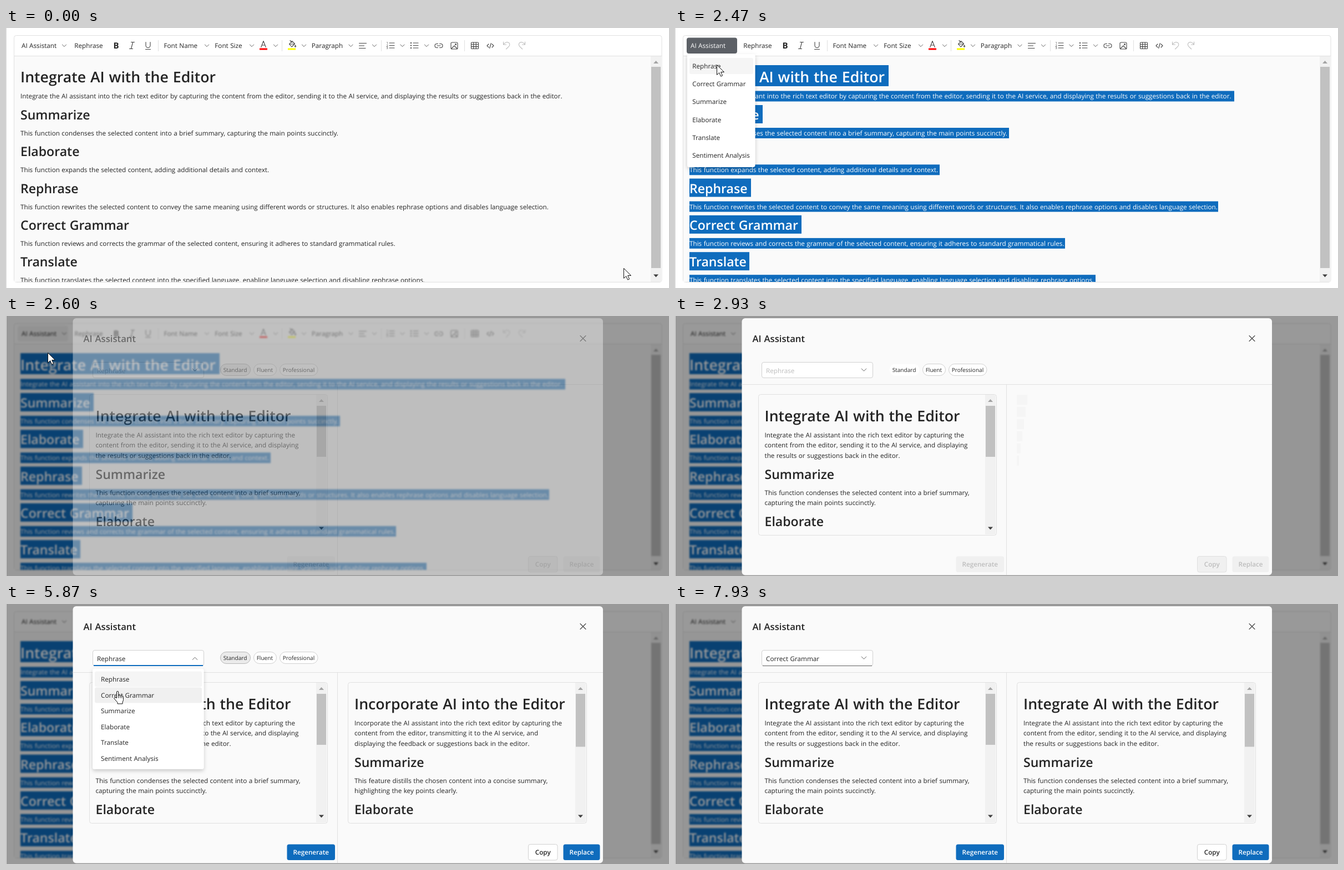
An HTML page for the animation above (8000 ms loop, 1195 by 469 pixels).

```html
<!DOCTYPE html>
<html lang="en">
<head>
<meta charset="utf-8">
<title>AI assistant in a rich text editor</title>
<style>
html, body { margin: 0; width: 100%; height: 100%; overflow: hidden; background: #fff; }
svg { display: block; width: 100vw; height: 100vh; }
text { font: 11.71px "Open Sans", "Noto Sans", sans-serif; fill: #242424; word-spacing: .034em;
  text-rendering: geometricPrecision; white-space: pre; }
.h1 { font-size: 26.7px; font-weight: 600; }
.h2 { font-size: 23.1px; font-weight: 600; }
.title { font-size: 16.7px; font-weight: 600; }
.chip { font-size: 10.05px; }
.btn { font-weight: 600; text-anchor: middle; }
.mark { fill: #0f6cbd; display: none; }
.selected .mark { display: inline; }
.selected text { fill: #fff; }
.icon { fill: none; stroke: #424242; stroke-width: 1.1; stroke-linecap: round; stroke-linejoin: round; }
.thin { stroke: #616161; stroke-width: 1; }
.faint { stroke: #bdbdbd; }
.busy .btn, .busy .value { fill: #bdbdbd; }
.busy .btnbox { fill: #f0f0f0; stroke: none; }
.busy .outline { stroke: #e0e0e0; }
.primary { fill: #0f6cbd; }
.onblue { fill: #fff; }
.outline { fill: #fff; stroke: #d1d1d1; }
</style>
</head>
<body>
<svg id="stage" viewBox="0 0 1195 469" xmlns="http://www.w3.org/2000/svg"></svg>
<script>
const TICK = 1000 / 15, LOOP = 8000;

const text = (x, y, s, cls = '', extra = '') => `<text x="${x}" y="${y}" class="${cls}" ${extra}>${s}</text>`;
const rect = (x, y, w, h, fill, extra = '') =>
  `<rect x="${x}" y="${y}" width="${w}" height="${h}" ${fill ? `fill="${fill}"` : ''} ${extra}/>`;
const icon = (d, cls = '', extra = '') => `<path class="icon ${cls}" d="${d}" ${extra}/>`;
const chevron = (x, y, up, r = 3.6) =>
  icon(`M${x - r} ${y + (up ? 2 : -2)}l${r} ${up ? -r : r} ${r} ${up ? r : -r}`, 'thin');
const group = (id, body, extra = '') => `<g id="${id}" ${extra}>${body}</g>`;

function scrollbar(x, top, bottom, thumbTop, thumbBottom) {
  const m = x + 9.5;
  return rect(x, top, 19, bottom - top, '#f1f1f1') +
    rect(x + 1, thumbTop, 17, thumbBottom - thumbTop, '#c1c1c1') +
    `<path d="M${m - 4.5} ${top + 13}l4.5 -5 4.5 5z" fill="#a3a3a3"/>` +
    `<path d="M${m - 4.5} ${bottom - 13.5}l4.5 5 4.5 -5z" fill="#404040"/>`;
}

function toolbar() {
  const labels = [[123.3, 'Rephrase'], [284.5, 'Font Name'], [376.3, 'Font Size'], [550.8, 'Paragraph']];
  return labels.map(([x, s]) => text(x, 36.3, s)).join('') +
    [362, 443, 486, 537, 621.5, 664, 714.5, 758].map(x => chevron(x, 32)).join('') +
    [274.5, 497.5, 676.5, 826.5].map(x => rect(x - .5, 22, 1, 20, '#e0e0e0')).join('') +
    text(193.5, 37.3, 'B', '', 'style="font-size:15px;font-weight:700"') +
    icon('M225.5 25.5h6M222.5 37.5h6M228.8 25.5l-3.4 12') +
    icon('M252 25.5v6a4 4 0 0 0 8 0v-6M251.5 38.5h9') +
    icon('M459.8 34.5l4.2 -11 4.2 11M461.2 31h5.6') + rect(457, 36.5, 14, 3, '#ff0000') +
    icon('M510.5 29l5 -5.5 5 5 -5.5 5.5zM512 22.5l3.5 3.5M510.5 29h9M521.5 31q-2 3 0 3.3 2 -.3 0 -3.3') +
    rect(508, 36.5, 14, 3, '#ffff00') +
    icon('M636.5 27.5h13M636.5 32h9M636.5 36.5h11.5') +
    [27, 31.5, 36].map((y, i) => icon(`M691 ${y}h9`) +
      text(685.5, y + 2, i + 1, '', 'style="font-size:5.5px"') +
      icon(`M734 ${y}h9`) + rect(729, y - 1, 2, 2, '#424242')).join('') +
    icon('M778.5 28.5h-2a3.4 3.4 0 0 0 0 7h2M781.5 28.5h2a3.4 3.4 0 0 1 0 7h-2M777 32h6') +
    rect(802, 26, 12, 12, 'none', 'rx="2" class="icon"') + icon('M803 37l5 -5 5 5') +
    '<circle cx="810.5" cy="29.5" r="1" class="icon"/>' +
    rect(838.5, 26, 13, 11.5, 'none', 'rx="1" class="icon"') +
    icon('M838.5 29.8h13M838.5 33.6h13M842.8 26v11.5M847.2 26v11.5') +
    icon('M870 29l-3 3 3 3M876 29l3 3 -3 3M874.3 27.5l-2.6 9') +
    icon('M896.5 25v5h5M896.8 29.8q3 -4.3 6.5 -4.3 4.5 .4 4.5 4.5 0 2 -1.8 3.7l-4.5 4.3', 'faint') +
    icon('M935.5 25v5h-5M935.2 29.8q-3 -4.3 -6.5 -4.3 -4.3 .4 -4.3 4.5 0 2 1.8 3.7l4.5 4.3', 'faint');
}

// heading, right edge of its highlight, paragraph, right edge of its highlight
const SECTIONS = [
  ['Summarize', 158, 'This function condenses the selected content into a brief summary, capturing the main points succinctly.', 602],
  ['Elaborate', 139, 'This function expands the selected content, adding additional details and context.', 477],
  ['Rephrase', 137, 'This function rewrites the selected content to convey the same meaning using different words or structures. It also enables rephrase options and disables language selection.', 979],
  ['Correct Grammar', 228, 'This function reviews and corrects the grammar of the selected content, ensuring it adheres to standard grammatical rules.', 703],
  ['Translate', 134, 'This function translates the selected content into the specified language, enabling language selection and disabling rephrase options.', 758]
];

function article() {
  const line = (y, top, h, right, s, cls) =>
    rect(26, top, right - 26, h, '', 'class="mark"') + text(26, y, s, cls);
  let out = line(98, 67, 38, 385, 'Integrate AI with the Editor', 'h1') +
    line(127.4, 113.5, 19, 1008, 'Integrate the AI assistant into the rich text editor by capturing the content from the editor, sending it to the AI service, and displaying the results or suggestions back in the editor.');
  SECTIONS.forEach(([head, hr, para, pr], i) => {
    const y = 66.3 * i;
    out += line(165 + y, 139 + y, 33, hr, head, 'h2') + line(193.9 + y, 180 + y, 19, pr, para);
  });
  return out;
}

function panel(x, w, thumbBottom, body) {
  return rect(x + .5, 141.5, w, 254, '#fafafa', 'rx="4" stroke="#e0e0e0"') +
    scrollbar(x + w - 20, 142, 394, 162, thumbBottom) + body;
}

function excerpt(x, title, intro, detail) {
  return text(x, 190, title, 'h1') +
    intro.map((s, i) => text(x, 218.6 + 18.7 * i, s)).join('') +
    text(x, 294, 'Summarize', 'h2') +
    detail.map((s, i) => text(x, 322.5 + 18.7 * i, s)).join('') +
    text(x, 379, 'Elaborate', 'h2');
}

const plain = x => excerpt(x, 'Integrate AI with the Editor',
  ['Integrate the AI assistant into the rich text editor by capturing the', 'content from the editor, sending it to the AI service, and displaying', 'the results or suggestions back in the editor.'],
  ['This function condenses the selected content into a brief summary,', 'capturing the main points succinctly.']);
const reworded = x => excerpt(x, 'Incorporate AI into the Editor',
  ['Incorporate the AI assistant into the rich text editor by capturing the', 'content from the editor, transmitting it to the AI service, and', 'displaying the feedback or suggestions back in the editor.'],
  ['This feature distills the chosen content into a concise summary,', 'highlighting the key points clearly.']);

const ACTIONS = ['Rephrase', 'Correct Grammar', 'Summarize', 'Elaborate', 'Translate', 'Sentiment Analysis'];
const list = (x, y, step) => ACTIONS.map((s, i) => text(x, y + step * i, s)).join('');
const chip = (x, w, s, id) => rect(x + .5, 86.5, w, 21, '#fff', `rx="10.5" stroke="#d1d1d1" ${id ? `id="${id}"` : ''}`) +
  text(x + 5.7, 101, s, 'chip');
const button = (x, w, s, primary) =>
  rect(x + .5, 433.5, w, 28.5, '', `rx="3.5" class="btnbox ${primary ? 'primary' : 'outline'}"`) +
  text(x + w / 2 + .5, 452.3, s, primary ? 'btn onblue' : 'btn');

function dialog() {
  return rect(120.5, 4, 955.5, 463.5, '#fafafa', 'rx="6"') +
    text(139.5, 47.3, 'AI Assistant', 'title') + icon('M1035 35.5l10 10M1045 35.5l-10 10') +
    rect(156.5, 83.5, 200, 28, '#fff', 'rx="3.5" stroke="#d1d1d1"') +
    rect(158, 111, 197, 1, '#616161', 'id="underline"') +
    text(164, 102.8, '', 'value', 'id="value"') +
    group('down', chevron(340.5, 97, false, 4.3)) + group('up', chevron(340.5, 98.5, true, 4.3)) +
    group('chips', chip(386, 54, 'Standard', 'standard') + chip(446, 41, 'Fluent') + chip(493, 68.5, 'Professional')) +
    rect(120.5, 123, 955.5, 1, '#e0e0e0') + rect(597, 123, 1, 344, '#e0e0e0') +
    panel(150, 429, 254, plain(161.5)) +
    group('result', panel(616, 430, 257.5, group('reworded', reworded(628)) + group('fixed', plain(628)))) +
    group('shimmer', [...Array(6).keys()].map(i => rect(0, 142 + 22 * i, 19 - 3 * i, 18, '#f5f5f5')).join('')) +
    button(506, 86.5, 'Regenerate', true) + button(941, 52.5, 'Copy') + button(1004, 66, 'Replace', true);
}

document.getElementById('stage').innerHTML = `
  <defs>
    <clipPath id="page"><rect x="15" y="51" width="1147" height="407"/></clipPath>
    <filter id="soft" filterUnits="userSpaceOnUse" x="-10" y="-10" width="1215" height="489" color-interpolation-filters="sRGB">
      <feGaussianBlur stdDeviation="1.5"/></filter>
    <filter id="shadow" x="-20%" y="-20%" width="140%" height="140%">
      <feDropShadow dx="0" dy="3" stdDeviation="3.5" flood-opacity=".2"/></filter>
  </defs>` +
  group('base', rect(-20, -20, 1235, 509, '#fff') +
    rect(14.5, 13.5, 1167.5, 445, '#fff', 'rx="4" stroke="#e0e0e0"') +
    rect(15, 50, 1166.5, 408, '#fafafa') + rect(15, 50, 1167, 1, '#e0e0e0') +
    rect(21, 17.5, 91, 28.5, '#5c6066', 'rx="4" id="pressed"') +
    text(28, 36.3, 'AI Assistant', '', 'id="assist"') + chevron(105, 32) + toolbar() +
    `<g clip-path="url(#page)">${group('article', article())}</g>` +
    scrollbar(1162, 51, 458, 70, 433)) +
  rect(1, 0, 1194, 469, '#000', 'id="shade"') +
  group('menu', rect(22, 47, 122.5, 204, '#fff', 'rx="4" filter="url(#shadow)"') +
    rect(26, 54, 115, 29, '#f5f5f5', 'rx="3" id="hover"') + list(31.3, 73.2, 32.1)) +
  group('dialog', dialog()) +
  group('popup', rect(156, 116.5, 200.5, 181.5, '#fff', 'rx="4" filter="url(#shadow)"') +
    rect(160, 121.5, 193, 28, '#f5f5f5', 'rx="3"') +
    rect(160, 150.5, 193, 28, '#f0f0f0', 'rx="3" id="option"') + list(171, 140, 28.6)) +
  rect(0, 0, 1, 469, '#dcdcdc') +
  group('cursor',
    '<path id="arrow" d="M.5 .5v18l4.2 -3.9 2.9 6.6 3 -1.3 -2.9 -6.4h5.8z" fill="#fff" stroke="#111"/>' +
    '<path id="hand" transform="translate(-7)" d="M5.5 13V2.5a1.6 1.6 0 0 1 3.2 0V9.3q.2 -1.2 1.6 -1.2t1.6 1.5q.2 -1 1.5 -1t1.5 1.5q.2 -.8 1.3 -.8t1.3 1.5V16q0 2 -1.5 4.5V23.5H7V21L1.3 14.5q-1 -1.6 .3 -2.3 1.2 -.6 2.2 .4zM8.7 9.3v4M11.9 9.6v3.7M14.9 10v3.3" fill="#fff" stroke="#111"/>');

const $ = id => document.getElementById(id);
const set = (id, name, value) => $(id).setAttribute(name, value);
const show = (id, on) => set(id, 'display', on ? 'inline' : 'none');
const clamp = v => Math.max(0, Math.min(1, v));
const within = (n, a, b) => n >= a && n < b;

// pointer stops: tick, x, y
const PATH = [[0, 1113, 433], [1, 690, 210], [2, 287, 5], [6, 265, 3], [13, 70, 27], [26, 70, 27], [30, 75, 66],
  [62, 75, 66], [63, 640, 260], [74, 353, 95], [78, 353, 95], [88, 201, 156.5], [95, 201, 156.5], [109, 139, 466]];

function pointer(n) {
  const i = Math.max(1, PATH.findIndex(p => p[0] >= n));
  const [t0, x0, y0] = PATH[i - 1], [t1, x1, y1] = PATH[i];
  const k = (n - t0) / (t1 - t0);
  return [x0 + (x1 - x0) * k, y0 + (y1 - y0) * k];
}

function draw(ms) {
  const n = Math.floor((ms + 4) / TICK) % 120;
  const modal = n >= 38, grammar = n >= 97, open = within(n, 80, 97);
  const busy = n < 63 || within(n, 97, 119);

  const pressed = n >= 17 && n < 38;
  set('pressed', 'opacity', pressed ? 1 : modal ? clamp((42 - n) / 4) * .1 : 0);
  set('assist', 'style', pressed ? 'fill:#fff' : '');
  set('article', 'class', n >= 37 ? 'selected' : '');
  show('menu', pressed);
  set('menu', 'opacity', clamp((n - 16) / 3));
  show('hover', n >= 29);

  if (modal) set('base', 'filter', 'url(#soft)'); else $('base').removeAttribute('filter');
  set('shade', 'opacity', .4 * clamp((n - 37) / 2));
  show('dialog', modal);
  set('dialog', 'opacity', clamp((n - 37.8) / 3));
  set('dialog', 'class', busy ? 'busy' : '');

  $('value').textContent = grammar ? 'Correct Grammar' : 'Rephrase';
  show('underline', !busy);
  set('underline', 'fill', open ? '#0f6cbd' : '#616161');
  set('underline', 'y', open ? 110 : 111);
  set('underline', 'height', open ? 2 : 1);
  show('down', !open);
  show('up', open);
  show('popup', open);
  set('popup', 'opacity', clamp((n - 79) / 2));
  show('option', n >= 86);

  const active = n < 43 || n >= 58;
  show('chips', !grammar);
  set('standard', 'fill', active ? '#ebebeb' : '#fff');
  set('standard', 'stroke', active ? '#b8b8b8' : 'none');

  show('result', !busy);
  show('reworded', !grammar);
  show('fixed', grammar);
  const start = grammar ? 102 : 44;
  show('shimmer', busy && n >= start);
  set('shimmer', 'transform', `translate(${616 + 5.9 * (n - start)})`);

  const seen = n < 42 || within(n, 64, 110);
  show('cursor', seen);
  if (seen) {
    const [x, y] = pointer(Math.min(n, 109));
    const hand = within(n, 72, 97);
    set('cursor', 'transform', `translate(${x} ${y})`);
    show('arrow', !hand);
    show('hand', hand);
  }
}

const begin = performance.now();
function frame() {
  draw((performance.now() - begin) % LOOP);
  requestAnimationFrame(frame);
}
frame();
</script>
</body>
</html>
```
